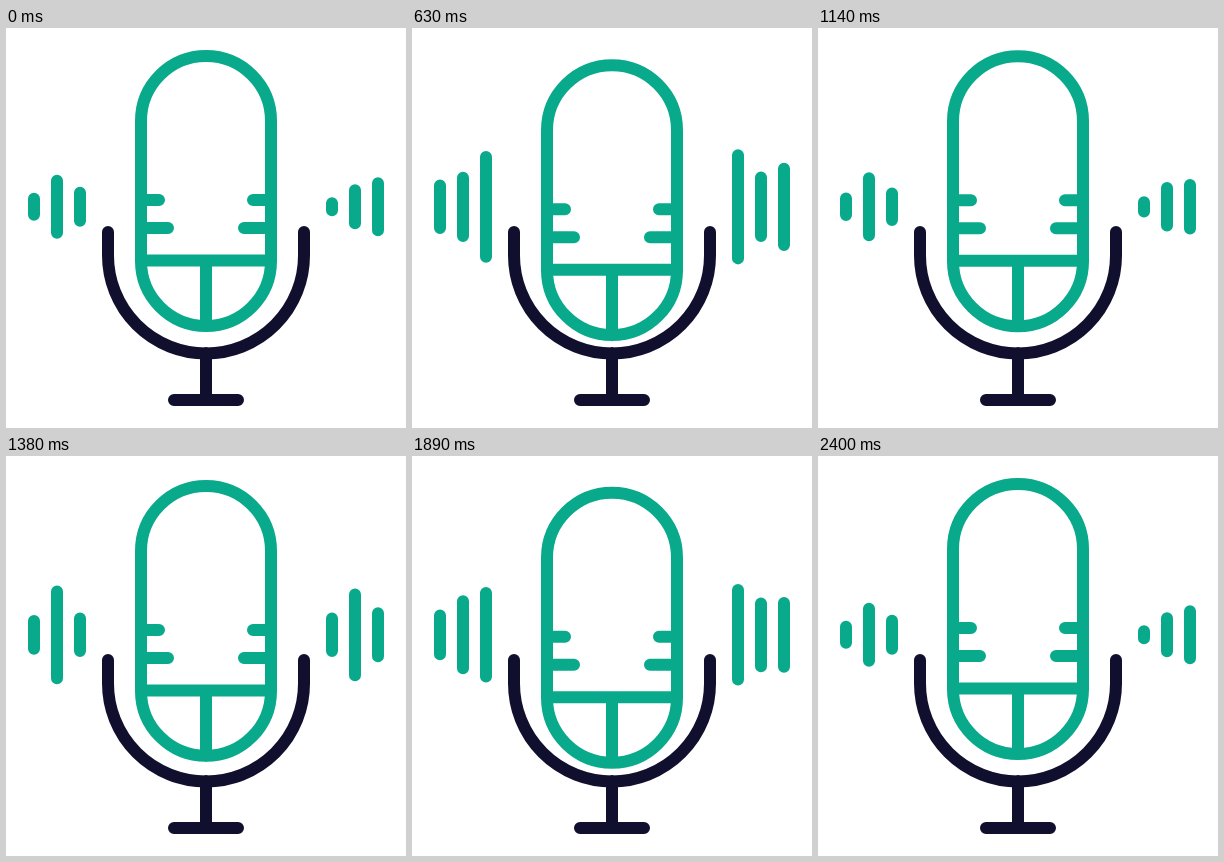
These frames come from a looping animation (400 by 400 pixels, 2.43 s). An HTML page:

```html
<!DOCTYPE html>
<html lang="en">
<head>
<meta charset="utf-8">
<title>Microphone</title>
<style>
  html, body { margin: 0; height: 100%; overflow: hidden; background: #fff; }
  svg { display: block; width: 100%; height: 100%; }
  path { fill: none; stroke: #09aa8c; stroke-width: 12; stroke-linecap: round; }
  .stand { stroke: #10102e; }
</style>
</head>
<body>
<svg viewBox="0 0 400 400">
  <path class="stand" d="M102 204V227.5A98 98 0 0 0 298 227.5V204M200 325V372M168 372H232"/>
  <path id="mic" d="M135 93A65 65 0 0 1 265 93V233A65 65 0 0 1 135 233ZM135 232.5H265M200 233V298
    M135 172H153M135 200H162M265 172H247M265 200H238"/>
  <path id="bars"/>
</svg>
<script>
const STEP = 30, STEPS = 81, CYCLE = 1200;
const MID = 178.8, GAP = 23, DROP = 9.2;
const mic = document.getElementById('mic');
const bars = document.getElementById('bars');

// Height of each bar at the four quarter beats of a cycle
const left = [[28, 46, 55, 34], [64, 117, 69, 117], [40, 47, 114, 24]];
const right = [[59, 53, 90, 21], [45, 118, 70, 93], [19, 58, 117, 42]];

const ease = u => (1 - Math.cos(Math.PI * u)) / 2;

function heightAt(beats, phase) {
  const i = Math.floor(phase * 4);
  const from = beats[i], to = beats[(i + 1) % 4];
  return from + (to - from) * ease(phase * 4 - i);
}

function bar(x, height) {
  const reach = height / 2 - 6;
  return `M${x} ${MID - reach}V${MID + reach}`;
}

function draw(now) {
  const t = Math.floor(now / STEP) % STEPS * STEP;
  const phase = t % CYCLE / CYCLE;
  mic.setAttribute('transform', `translate(0 ${DROP * ease(2 * phase)})`);
  bars.setAttribute('d', [
    ...left.map((beats, i) => bar(28 + GAP * i, heightAt(beats, phase))),
    ...right.map((beats, i) => bar(372 - GAP * i, heightAt(beats, phase)))
  ].join(''));
}

const start = performance.now();
function tick() {
  draw(performance.now() - start);
  requestAnimationFrame(tick);
}
tick();
</script>
</body>
</html>
```
